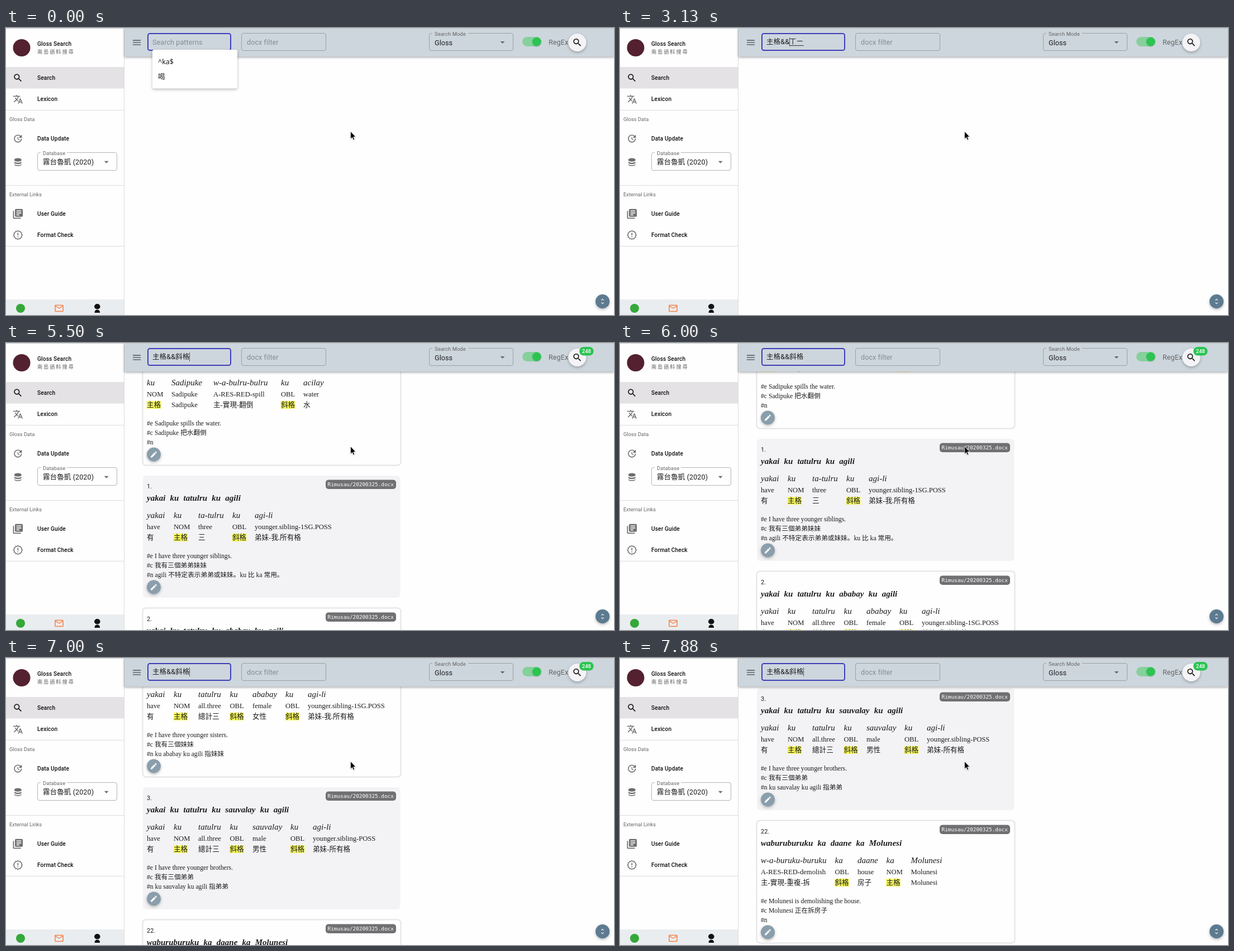
Recreate the animation shown at these times as an HTML page. Size 1088 by 515 pixels, loop 8000 ms.

```html
<!DOCTYPE html>
<html lang="en">
<head>
<meta charset="utf-8">
<title>Gloss Search</title>
<style>
html, body { margin: 0; width: 100%; height: 100%; overflow: hidden; background: #fefefe; }
svg { display: block; width: 1088px; height: 515px; }
text { font-family: Roboto, "Noto Sans CJK SC", "Noto Sans CJK JP", sans-serif; fill: #1c1c1e; white-space: pre; }
.serif { font-family: "Liberation Serif", "Noto Sans CJK SC", "Noto Sans CJK JP", serif; }
.italic { font-style: italic; }
.title { font-style: italic; font-weight: 700; word-spacing: 4.45px; }
.mono { font-family: "DejaVu Sans Mono", monospace; fill: #fff; }
.noto { font-family: "Noto Sans", "Noto Sans CJK SC", "Noto Sans CJK JP", sans-serif; }
.nav { font-weight: 500; letter-spacing: .01071em; fill: #111; }
.body { letter-spacing: .00938em; }
.gray { fill: #666; }
.hint { fill: #858c92; }
.badge { font-weight: 500; fill: #fff; text-anchor: middle; }
.shadow { filter: drop-shadow(0 2px 2.5px #0004); }
.faint { filter: drop-shadow(0 1px 1px #0003); }
.bar { filter: drop-shadow(0 1.5px 2px #0006); }
</style>
</head>
<body>
<svg id="stage" viewBox="0 0 1088 515"></svg>
<script>
const ICONS = {
  search: 'M15.5 14h-.79l-.28-.27C15.41 12.59 16 11.11 16 9.5 16 5.91 13.09 3 9.5 3S3 5.91 3 9.5 5.91 16 9.5 16c1.61 0 3.09-.59 4.23-1.57l.27.28v.79l5 4.99L20.49 19l-4.99-5zm-6 0C7.01 14 5 11.99 5 9.5S7.01 5 9.5 5 14 7.01 14 9.5 11.99 14 9.5 14z',
  translate: 'M12.87 15.07l-2.54-2.51.03-.03c1.74-1.94 2.98-4.17 3.71-6.53H17V4h-7V2H8v2H1v1.99h11.17C11.5 7.92 10.44 9.75 9 11.35 8.07 10.32 7.3 9.19 6.69 8h-2c.73 1.63 1.73 3.17 2.98 4.56l-5.09 5.02L4 19l5-5 3.11 3.11.76-2.04zM18.5 10h-2L12 22h2l1.12-3h4.75L21 22h2l-4.5-12zm-2.62 7l1.62-4.33L19.12 17h-3.24z',
  update: 'M11 8v5l4.25 2.52.77-1.28-3.52-2.09V8H11zm10 2V3l-2.64 2.64C16.74 4.01 14.49 3 12 3c-4.97 0-9 4.03-9 9s4.03 9 9 9 9-4.03 9-9h-2c0 3.86-3.14 7-7 7s-7-3.14-7-7 3.14-7 7-7c1.93 0 3.68.79 4.95 2.05L14 10h7z',
  books: 'M4 6H2v14c0 1.1.9 2 2 2h14v-2H4V6zm16-4H8c-1.1 0-2 .9-2 2v12c0 1.1.9 2 2 2h12c1.1 0 2-.9 2-2V4c0-1.1-.9-2-2-2zm-1 9H9V9h10v2zm-4 4H9v-2h6v2zm4-8H9V5h10v2z',
  mail: 'M22 6c0-1.1-.9-2-2-2H4c-1.1 0-2 .9-2 2v12c0 1.1.9 2 2 2h16c1.1 0 2-.9 2-2V6zm-2 0l-8 5-8-5h16zm0 12H4V8l8 5 8-5v10z',
  edit: 'M3 17.25V21h3.75L17.81 9.94l-3.75-3.75L3 17.25zM20.71 7.04c.39-.39.39-1.02 0-1.41l-2.34-2.34c-.39-.39-1.02-.39-1.41 0l-1.83 1.83 3.75 3.75 1.83-1.83z',
  unfold: 'M12 5.83L15.17 9l1.41-1.41L12 3 7.41 7.59 8.83 9 12 5.83zm0 12.34L8.83 15l-1.41 1.41L12 21l4.59-4.59L15.17 15 12 18.17z',
  menu: 'M3 18h18v-2H3v2zm0-5h18v-2H3v2zm0-7v2h18V6H3z',
  arrow: 'M7 10l5 5 5-5z',
  database: 'M4 6a8 3 0 0 1 16 0v2a8 3 0 0 1-16 0zM4 10.5a8 3 0 0 0 16 0v3.3a8 3 0 0 1-16 0zM4 16.2a8 3 0 0 0 16 0v2a8 3 0 0 1-16 0z'
};

const text = (x, y, str, size, cls = '', extra = '') =>
  `<text x="${x}" y="${y}" font-size="${size}" class="${cls}" ${extra}>${str.replace(/&/g, '&amp;')}</text>`;
const rect = (x, y, w, h, fill, extra = '') =>
  `<rect x="${x}" y="${y}" width="${w}" height="${h}" fill="${fill}" ${extra}/>`;
const circle = (x, y, r, fill, extra = '') =>
  `<circle cx="${x}" cy="${y}" r="${r}" fill="${fill}" ${extra}/>`;
const icon = (name, x, y, fill = '#6e6e70', size = 18.75) =>
  `<path d="${ICONS[name]}" fill="${fill}" transform="translate(${x - size / 2} ${y - size / 2}) scale(${size / 24})"/>`;
const box = (x, y, w, h, stroke, width = 1) =>
  rect(x, y, w, h, 'none', `rx="3.5" stroke="${stroke}" stroke-width="${width}"`);

// Column: x, word, English gloss, Chinese gloss
const NOM = ['NOM', '主格'], OBL = ['OBL', '斜格'];
const CARDS = [
  { no: 0, title: 'ku Sadipuke wa-bulru ku acilay',
    cols: [[252, 'ku', ...NOM], [296, 'Sadipuke', 'Sadipuke', 'Sadipuke'], [371, 'w-a-bulru-bulru', 'A-RES-RED-spill', '主-實現-翻倒'],
      [492, 'ku', ...OBL], [532, 'acilay', 'water', '水']],
    notes: ['#e Sadipuke spills the water.', '#c Sadipuke 把水翻倒', '#n'] },
  { no: 1, title: 'yakai ku tatulru ku agili',
    cols: [[252, 'yakai', 'have', '有'], [300, 'ku', ...NOM], [344, 'ta-tulru', 'three', '三'],
      [405, 'ku', ...OBL], [445, 'agi-li', 'younger.sibling-1SG.POSS', '弟妹-我.所有格']],
    notes: ['#e I have three younger siblings.', '#c 我有三個弟弟妹妹', '#n agili 不特定表示弟弟或妹妹。ku 比 ka 常用。'] },
  { no: 2, title: 'yakai ku tatulru ku ababay ku agili',
    cols: [[252, 'yakai', 'have', '有'], [300, 'ku', ...NOM], [344, 'tatulru', 'all.three', '總計三'], [400.5, 'ku', ...OBL],
      [441, 'ababay', 'female', '女性'], [500, 'ku', ...OBL], [540, 'agi-li', 'younger.sibling-1SG.POSS', '弟妹-我.所有格']],
    notes: ['#e I have three younger sisters.', '#c 我有三個妹妹', '#n ku ababay ku agili 指妹妹'] },
  { no: 3, title: 'yakai ku tatulru ku sauvalay ku agili',
    cols: [[252, 'yakai', 'have', '有'], [300, 'ku', ...NOM], [344, 'tatulru', 'all.three', '總計三'], [400.5, 'ku', ...OBL],
      [441, 'sauvalay', 'male', '男性'], [509, 'ku', ...OBL], [549, 'agi-li', 'younger.sibling-POSS', '弟妹-所有格']],
    notes: ['#e I have three younger brothers.', '#c 我有三個弟弟', '#n ku sauvalay ku agili 指弟弟'] },
  { no: 22, title: 'waburuburuku ka daane ka Molunesi',
    cols: [[252, 'w-a-buruku-buruku', 'A-RES-RED-demolish', '主-實現-重複-拆'], [384.5, 'ka', ...OBL], [425, 'daane', 'house', '房子'],
      [476.5, 'ka', ...NOM], [520.5, 'Molunesi', 'Molunesi', 'Molunesi']],
    notes: ['#e Molunesi is demolishing the house.', '#c Molunesi 正在拆房子', '#n'] }
];

function column([x, word, english, chinese]) {
  const marked = chinese === '主格' || chinese === '斜格';
  return (marked ? rect(x - .3, 104, 25.6, 14, '#f6f75c') : '') +
    text(x, 76, word, 15, 'serif italic') +
    text(x, 96, english, 12.6, 'serif') +
    text(x, 115, chinese, 12.6, 'serif');
}

function card({ no, title, cols, notes }, i) {
  const frame = i % 2
    ? rect(245, 0, 460.5, 219, '#f3f2f4', 'rx="6"')
    : rect(244.5, -.5, 462, 220, '#fefefe', 'rx="6" stroke="#e4e3e8" stroke-width="2"');
  return `<g transform="translate(0 ${i * 238})">` + frame +
    text(252, 23, no + '.', 10.95, 'body') +
    rect(572, 7.5, 126, 16.5, '#706f72', 'rx="5"') +
    text(575.5, 19, 'Rimusau/20200325.docx', 9.375, 'mono') +
    text(252, 45, title, 15, 'serif title') +
    cols.map(column).join('') +
    notes.map((n, k) => text(252, 148 + 17 * k, n, 11.67, 'serif')).join('') +
    circle(264.5, 200, 12.5, '#8a9eac', 'class="shadow"') +
    icon('edit', 264.5, 200, '#fff', 14.5) + '</g>';
}

function burst(cx, cy) {
  const points = Array.from({ length: 24 }, (_, i) => {
    const a = i * Math.PI / 12, r = i % 2 ? 6.6 : 7.9;
    return [cx + r * Math.sin(a), cy - r * Math.cos(a)].map(v => v.toFixed(1));
  }).join(' ');
  return `<polygon points="${points}" fill="none" stroke="#6e6e70" stroke-width="1.4"/>` +
    rect(cx - .8, cy - 4, 1.6, 4.8, '#6e6e70') + rect(cx - .8, cy + 2.4, 1.6, 1.6, '#6e6e70');
}

const sidebar = () =>
  rect(0, 0, 211, 515, '#fefefe') + rect(211, 0, 1, 515, '#dcdcde') +
  circle(28, 35.5, 15.5, '#53212f') +
  text(56, 32, 'Gloss Search', 10.16, 'nav') +
  text(56, 45.5, '南島語料搜尋', 9.3, 'gray', 'letter-spacing="1.8"') +
  rect(0, 70, 211, 38.5, '#e4e2e4') +
  [147, 282, 391].map(y => rect(0, y, 211, 1, '#dcdcde')).join('') +
  icon('search', 21.3, 89.5, '#151515') + icon('translate', 21.3, 128) +
  icon('update', 21.3, 198.5) + icon('database', 21.3, 240.5) +
  icon('books', 21.3, 333.5, '#6e6e70', 21) + burst(21.3, 371.5) +
  [['Search', 89], ['Lexicon', 127], ['Data Update', 198], ['User Guide', 333], ['Format Check', 371]]
    .map(([label, y]) => text(56, y + 4.3, label, 10.16, 'nav')).join('') +
  text(6, 167.3, 'Gloss Data', 9.375, 'gray') + text(6, 302.3, 'External Links', 9.375, 'gray') +
  box(56.5, 223.5, 142, 32, '#b4b4b6') + rect(62, 222, 47, 4, '#fefefe') +
  text(66, 228.3, 'Database', 9.375, 'gray body') +
  text(66, 245, '霧台魯凱 (2020)', 12.5, 'body') + icon('arrow', 179.7, 240.3) +
  rect(0, 487, 211, 28, '#eaedf0') +
  circle(26, 503, 8, '#35a83a') + icon('mail', 95, 503, '#f5834a') +
  '<path d="M158 500a5.3 5 0 1 1 10.6 0a5.3 4.6 0 0 1-10.6 0zM158.5 511q0-5.5 4.8-5.5t4.8 5.5z" fill="#111"/>';

const toolbar = () =>
  rect(212, 0, 876, 51.5, '#cdd6dd', 'class="bar"') + icon('menu', 234, 26, '#5d656b') +
  box(254, 10, 148, 30, '#3e3fb8', 2) +
  box(421.5, 9.5, 151, 31, '#9aa1a7') + text(431, 29.5, 'docx filter', 12.5, 'body hint') +
  box(757.5, 9.5, 150, 31, '#9aa1a7') + rect(763, 8, 64, 4, '#cdd6dd') +
  text(767, 13.5, 'Search Mode', 9.375, 'body gray') + text(767, 31, 'Gloss', 12.5, 'body') +
  icon('arrow', 888.5, 25.5, '#5d656b') +
  rect(924, 16, 34, 17, '#86d09c', 'rx="8.5"') + circle(949.7, 24.5, 7.8, '#2bc451', 'class="faint"') +
  text(971, 29.5, 'RegEx', 12.5, 'body gray') +
  circle(1022.3, 26, 16, '#f4f3f5', 'class="shadow"') + icon('search', 1022.3, 26, '#151515');

const stage = document.getElementById('stage');
stage.innerHTML =
  rect(0, 0, 1088, 515, '#fefefe') +
  `<g id="results">${CARDS.map(card).join('')}</g>` +
  sidebar() + toolbar() +
  rect(0, 0, 1088, 1, '#c3c7cb') +
  text(262, 29.5, 'Search patterns', 12.5, 'body hint', 'id="placeholder"') +
  text(262, 29.3, '', 12.5, 'body', 'id="query"') +
  rect(262, 31, 0, 1, '#333', 'id="underline"') +
  rect(262, 17, 1, 16, '#4a4bb5', 'id="caret"') +
  '<g id="popup">' + rect(262, 39, 152, 69.5, '#fff', 'rx="3" class="shadow"') +
  text(272, 65, '^ka$', 12.5, 'noto') + text(272, 92, '喝', 12.5, 'noto') + '</g>' +
  '<g id="badge">' + rect(1026, 7, 25.5, 15.6, '#2bc451', 'rx="7.8"') +
  text(1038.8, 18.2, '248', 9.375, 'badge') + '</g>' +
  circle(1067.5, 490.7, 12.6, '#5d7b90', 'class="shadow"') + icon('unfold', 1067.5, 490.7, '#fff', 13) +
  '<path d="M616.5 185.5v13.6l3.1-2.8 2 4.7 2.2-.9-2-4.6h4.1z" fill="#000" stroke="#fff" stroke-width=".8" class="faint"/>';

const [results, placeholder, query, underline, caret, popup, badge] =
  ['results', 'placeholder', 'query', 'underline', 'caret', 'popup', 'badge'].map(id => document.getElementById(id));

// All times below are in ticks of 125 ms.
const TICK = 125, TICKS = 64, RESULTS_AT = 38, FULL = '主格&&斜格';

// Input state: start, committed text, composing text, caret position (-1 hides it)
const TYPING = [
  [0, '', '', -1], [1, '', '', 0],
  [6, '', 'ㄓ', -1], [7, '', 'ㄓㄨ', -1], [8, '', '主', -1],
  [10, '', '主ㄍ', -1], [12, '', '主ㄍㄜ', -1], [13, '', '主格', -1],
  [14, '主格', '', 2], [19, '主格', '', -1], [20, '主格&', '', 3], [21, '主格&&', '', 4],
  [25, '主格&&', 'ㄒㄧ', 4], [27, '主格&&', 'ㄒㄧㄝ', -1], [28, '主格&&', '斜', -1],
  [30, '主格&&', '斜ㄍ', -1], [31, '主格&&', '斜ㄍㄜ', -1], [32, '主格&&', '斜格', 6],
  [34, FULL, '', 6], [38, FULL, '', -1], [43, FULL, '', 6], [48, FULL, '', -1],
  [49, FULL, '', 6], [52, FULL, '', -1], [55, FULL, '', 6], [59, FULL, '', -1], [62, FULL, '', 6]
];

// Top of the first card over time
const SCROLL = [
  [42, 72], [44, 0], [46, -46], [47, -46], [48, -66], [50, -218], [52, -327.3],
  [56, -482], [57, -505], [59, -528], [61, -528], [62, -575], [63, -660]
];

function scrollAt(tick) {
  const next = SCROLL.findIndex(([t]) => t >= tick);
  if (next === 0) return SCROLL[0][1];
  const [t0, y0] = SCROLL[next - 1], [t1, y1] = SCROLL[next];
  return y0 + (y1 - y0) * (tick - t0) / (t1 - t0);
}

const show = (el, on) => el.setAttribute('visibility', on ? 'visible' : 'hidden');
const widthOf = count => count > 0 ? query.getSubStringLength(0, count) : 0;

function draw(tick) {
  const [, committed, composing, caretAt] = TYPING.findLast(([t]) => t <= tick);
  query.textContent = committed + composing;
  show(placeholder, !query.textContent);
  show(popup, tick < 6);

  const start = widthOf(committed.length);
  underline.setAttribute('x', 262.5 + start);
  underline.setAttribute('width', composing ? widthOf(query.textContent.length) - start : 0);
  caret.setAttribute('x', Math.floor(262 + widthOf(caretAt)));
  show(caret, caretAt >= 0);

  show(results, tick >= RESULTS_AT);
  show(badge, tick >= RESULTS_AT);
  results.setAttribute('transform', `translate(0 ${scrollAt(tick)})`);
}

const startTime = performance.now();
function loop() {
  draw(Math.floor((performance.now() - startTime) / TICK) % TICKS);
  requestAnimationFrame(loop);
}
loop();
</script>
</body>
</html>
```
